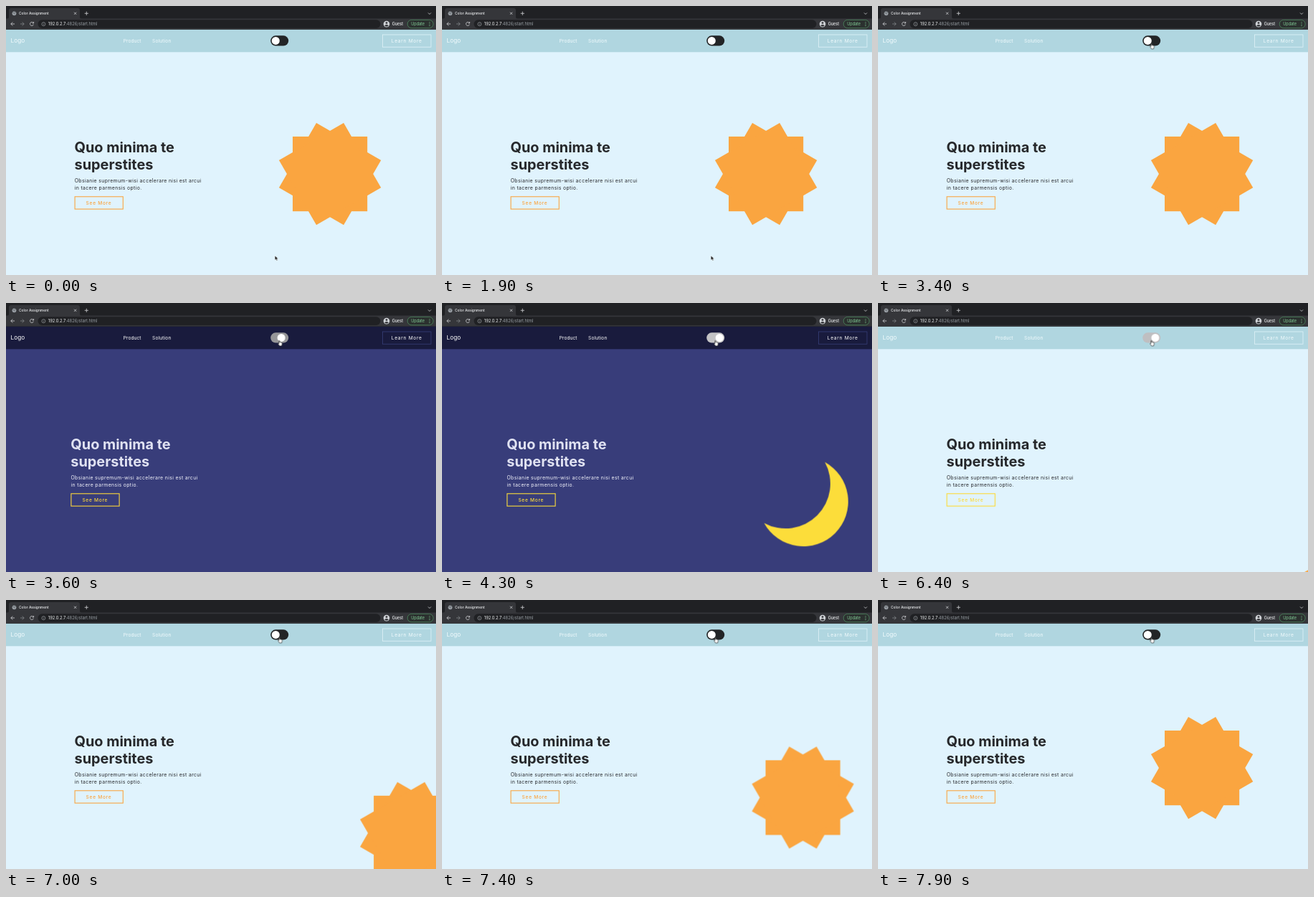
These frames come from a looping animation (600 by 375 pixels, 8 s). An HTML page:

```html
<!DOCTYPE html>
<html lang="en">
<head>
<meta charset="utf-8">
<title>Color Assignment</title>
<style>
  html, body { margin: 0; width: 100%; height: 100%; overflow: hidden; }
  svg { display: block; width: 100vw; height: 100vh; font-family: Inter, sans-serif; }

  /* Theme: night from 42.875 % to 79.8125 % of the loop */
  svg { animation: theme 8s step-end infinite; }
  @keyframes theme {
    0%, 79.8125%, 100% {
      --page: #e0f3fd; --nav: #b0d6e0; --ink: #26282b; --copy: #26282b;
      --outline: #e6f6fb; --link: #f2fbfd; --shift: 0px;
    }
    42.875% {
      --page: #383d7a; --nav: #191b3d; --ink: #e0e2f2; --copy: #f4f5fc;
      --outline: #3b4380; --link: #fff; --shift: -5.2px;
    }
  }
  .page { fill: var(--page); }
  .nav { fill: var(--nav); }
  .links { fill: var(--link); font-size: 6.67px; }
  .outline { fill: none; stroke: var(--outline); stroke-width: .7; }
  .spaced { letter-spacing: .67px; }
  .copy { transform: translateX(var(--shift)); }
  h1, .title { fill: var(--ink); font-size: 19.9px; font-weight: 700; }
  .lead { fill: var(--copy); font-size: 6.9px; letter-spacing: .36px; }

  .more { color: #f9a541; animation: accent 8s ease infinite; }
  .more rect { fill: none; stroke: currentColor; stroke-width: 1.1; }
  .more text { fill: currentColor; font-size: 6.67px; font-weight: 500; }
  @keyframes accent {
    0%, 42.875%, 83.5%, 100% { color: #f9a541; }
    46.5%, 79.8125% { color: #fcdd3a; }
  }

  .track { animation: track 8s ease infinite; }
  @keyframes track {
    0%, 42.875%, 84.8125%, 100% { fill: #222426; }
    47.875%, 79.8125% { fill: #c3c3c5; }
  }
  .knob { fill: #fff; animation: knob 8s ease infinite; }
  @keyframes knob {
    0%, 42.875%, 84.8125%, 100% { transform: none; }
    47.875%, 79.8125% { transform: translateX(10.83px); }
  }

  .sun { fill: #faa540; animation: sun 8s step-end infinite; }
  @keyframes sun {
    0%, 96.6875%, 100% { transform: none; }
    42.875% { transform: translate(208px, 167px); }
    79.8125% { transform: translate(208px, 167px); animation-timing-function: linear; }
  }
  .moon { fill: #fcdd3a; animation: moon 8s step-end infinite; }
  @keyframes moon {
    0%, 79.8125%, 100% { transform: translate(208px, 167px); }
    42.875% { transform: translate(208px, 167px); animation-timing-function: linear; }
    59.75% { transform: none; }
  }

  .cursor { animation: travel 8s linear infinite; }
  @keyframes travel {
    0%, 23.75% { transform: translate(375.3px, 348px); animation-timing-function: ease-in-out; }
    32.5%, 35% { transform: translate(380px, 56px); }
    36.25%, 100% { transform: translate(380.3px, 51.8px); }
  }
  .arrow { animation: arrow 8s step-end infinite; }
  .hand { animation: hand 8s step-end infinite; }
  @keyframes arrow { 0% { opacity: 1; } 36.25%, 100% { opacity: 0; } }
  @keyframes hand { 0% { opacity: 0; } 36.25%, 100% { opacity: 1; } }

  .icon { fill: none; stroke: #d3d5d8; stroke-width: .8; }
</style>
</head>
<body>
<svg viewBox="0 0 600 375" preserveAspectRatio="none">
  <rect class="page" width="600" height="375"/>

  <g class="sun">
    <rect id="square" x="400" y="182" width="104.2" height="104.2"/>
    <use href="#square" transform="rotate(30 452.1 234.1)"/>
    <use href="#square" transform="rotate(60 452.1 234.1)"/>
  </g>
  <path class="moon" d="M460.4 162.6A62.5 62.5 0 1 1 375.6 247.4A62.5 62.5 0 0 0 460.4 162.6Z"/>

  <g class="copy">
    <text class="title" x="95.5" y="204.2">Quo minima te</text>
    <text class="title" x="95.5" y="227.5">superstites</text>
    <text class="lead" x="95.7" y="246.2">Obsianie supremum-wisi accelerare nisi est arcui</text>
    <text class="lead" x="95.7" y="256.2">in tacere parmensis optio.</text>
    <g class="more">
      <rect x="96.1" y="265.8" width="67.2" height="17.3"/>
      <text class="spaced" x="111.6" y="276.8">See More</text>
    </g>
  </g>

  <rect class="nav" y="32.5" width="600" height="31.8"/>
  <g class="links">
    <text x="6.6" y="51.4" font-size="8.2">Logo</text>
    <text x="163.8" y="50.8">Product</text>
    <text x="204" y="50.8" letter-spacing=".12">Solution</text>
    <rect class="outline" x="525.6" y="40" width="67.4" height="17.2"/>
    <text class="spaced" x="537.8" y="50.9">Learn More</text>
  </g>
  <rect class="track" x="369.2" y="41.3" width="25" height="14.2" rx="7.1"/>
  <circle class="knob" cx="376.3" cy="48.4" r="5.5"/>

  <!-- Browser window -->
  <rect width="600" height="18" fill="#202124"/>
  <rect y="17.5" width="600" height="15" fill="#35363a"/>
  <path d="M1 18Q4 18 4 15V6Q4 3 7 3H100Q103 3 103 6V15Q103 18 106 18Z" fill="#35363a"/>
  <rect y="32" width="600" height=".8" fill="#26282b"/>
  <circle cx="11.5" cy="10.3" r="2.9" fill="#9aa0a6"/>
  <path d="M9.5 9.3l2 .6 .4 1.6M12 8.2l1.6 1.4" class="icon" style="stroke:#4a4c50;stroke-width:.7"/>
  <text x="18" y="12.1" font-size="4.9" font-weight="500" fill="#eceef0">Color Assignment</text>
  <path class="icon" d="M95 8.7l3.2 3.2m0-3.2l-3.2 3.2M109.7 10.3h5.2m-2.6-2.6v5.2M589 9.5l2 2 2-2"/>
  <path class="icon" d="M12 25H6.8m2.5-2.5L6.8 25l2.5 2.5"/>
  <path class="icon" style="stroke:#85888c" d="M20 25h5.2m-2.5-2.5l2.5 2.5-2.5 2.5"/>
  <path class="icon" d="M38.1 23.6a2.5 2.5 0 1 0 .3 2.1M38.6 22v2h-2"/>
  <rect x="44.5" y="19.2" width="478" height="11.8" rx="5.9" fill="#202124"/>
  <g class="icon" style="stroke:#aeb2b7;stroke-width:.6">
    <circle cx="52.4" cy="25.2" r="2.5"/>
    <path d="M52.4 24.8v1.7m0-2.9v.6"/>
  </g>
  <text x="58.8" y="27.2" font-size="5.8" fill="#9aa0a6"><tspan fill="#f1f3f4">192.0.2.7</tspan>:4826/start.html</text>
  <circle cx="531" cy="25.1" r="4.3" fill="#d0d3d7"/>
  <circle cx="531" cy="23.6" r="1.4" fill="#35363a"/>
  <path d="M528.2 27.4q2.8-2.6 5.6 0q-2.8 2.4-5.6 0Z" fill="#35363a"/>
  <text x="538.7" y="27.1" font-size="5.5" font-weight="500" fill="#eceef0">Guest</text>
  <rect x="560.2" y="19.4" width="36" height="11.4" rx="5.7" fill="#2b312f" stroke="#4d8a5f" stroke-width=".8"/>
  <text x="565.2" y="27.1" font-size="5.5" fill="#81c995">Update</text>
  <g fill="#81c995">
    <circle cx="591" cy="22.8" r=".6"/><circle cx="591" cy="25.1" r=".6"/><circle cx="591" cy="27.4" r=".6"/>
  </g>

  <g class="cursor" stroke-linejoin="round">
    <path class="arrow" d="M0 0V6.2L1.4 4.9L2.4 7.1L3.5 6.6L2.6 4.5H4.4Z" fill="#111" stroke="#fff" stroke-width=".5"/>
    <path class="hand" d="M.5 .8Q1.1 0 1.7 .8V3Q2.6 2.5 3 3.2Q3.8 2.8 4.1 3.5Q5.1 3.3 5.1 4.4Q5.2 6 4.3 8H1.3Q.6 6.6-.8 4.9Q-.6 4.1 .5 4.8Z" fill="#fff" stroke="#111" stroke-width=".6"/>
  </g>
</svg>
</body>
</html>
```
